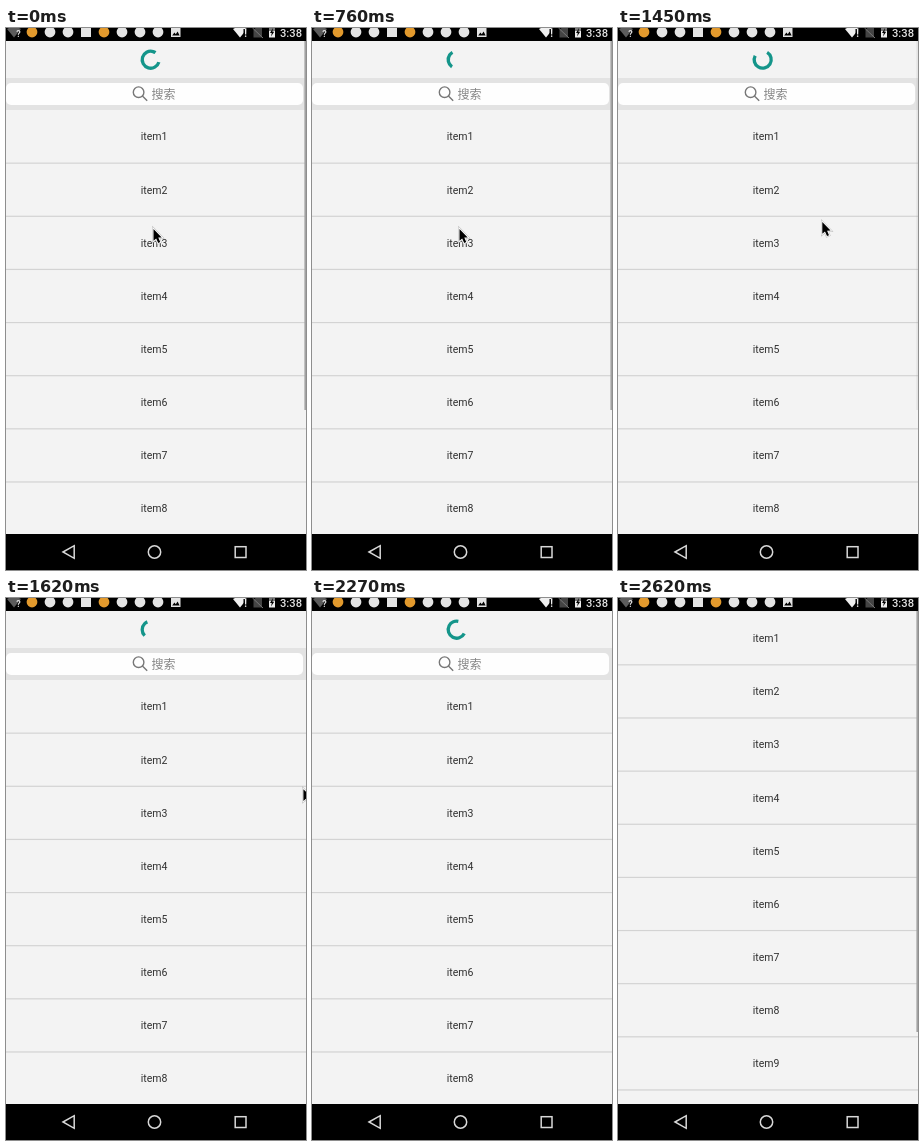
Recreate the animation shown at these times as an HTML page with a canvas. Size 300x542 px, loop 3790 ms.

```html
<!DOCTYPE html>
<html lang="zh">
<head>
<meta charset="utf-8">
<title>Pull to refresh</title>
<style>
html, body { margin: 0; width: 300px; height: 542px; overflow: hidden; background: #000; }
canvas { display: block; }
</style>
</head>
<body>
<canvas id="stage" width="300" height="542"></canvas>
<script>
const ctx = document.getElementById('stage').getContext('2d');
const LOOP = 3790, TOP = 13, BOTTOM = 506, ROW = 53.14, LIST_TOP = 82;
const CYCLE = 1332, SWEEP = 272, MIN_ARC = 16, TURN = 306;

const clamp = (v, lo, hi) => Math.min(hi, Math.max(lo, v));
// number of whole steps taken since a start time
const steps = (t, start, size, max) => clamp(Math.floor((t - start) / size) + 1, 0, max);

// cubic-bezier(.4, 0, .2, 1)
function ease(x) {
  if (x <= 0 || x >= 1) return clamp(x, 0, 1);
  let lo = 0, hi = 1, s;
  for (let i = 0; i < 20; i++) {
    s = (lo + hi) / 2;
    const u = 1 - s;
    if (1.2 * s * u * u + .6 * s * s * u + s * s * s < x) lo = s; else hi = s;
  }
  return s * s * (3 - 2 * s);
}

function rect(x, y, w, h, color) {
  ctx.fillStyle = color;
  ctx.fillRect(x, y, w, h);
}

function disc(x, y, r, color) {
  ctx.fillStyle = color;
  ctx.beginPath();
  ctx.arc(x, y, r, 0, 7);
  ctx.fill();
}

function path(points, closed) {
  ctx.beginPath();
  points.forEach(([x, y]) => ctx.lineTo(x, y));
  if (closed) ctx.closePath();
}

function fillPath(points, color) {
  path(points, true);
  ctx.fillStyle = color;
  ctx.fill();
}

function pen(color, width) {
  ctx.strokeStyle = color;
  ctx.lineWidth = width;
}

function label(text, x, y, font, color, align) {
  ctx.font = font;
  ctx.fillStyle = color;
  ctx.textAlign = align;
  ctx.fillText(text, x, y);
}

// The tail catches up with the head, then the head runs ahead, while all of it turns.
function spinner(t) {
  const turns = (80 + Math.floor((t - 50) / 170) * 170) / CYCLE;
  const n = Math.floor(turns), p = turns - n;
  const base = 37 + turns * TURN + n * SWEEP;
  const start = base + SWEEP * ease(p / .5);
  const end = base + MIN_ARC + SWEEP * (1 + ease((p - .42) / .5));
  pen('#14958a', 3.3);
  ctx.beginPath();
  ctx.arc(144.7, 31.7, 8.5, start * Math.PI / 180, end * Math.PI / 180);
  ctx.stroke();
}

function searchBar() {
  rect(0, 50, 300, LIST_TOP - 50, '#e3e3e3');
  ctx.fillStyle = '#fefefe';
  ctx.beginPath();
  ctx.roundRect(0, 55, 297, 22, 5);
  ctx.fill();
  pen('#777', 1.4);
  ctx.beginPath();
  ctx.arc(132.6, 64.2, 5.3, 0, 7);
  ctx.stroke();
  path([[136.4, 68], [141.2, 72.8]]);
  ctx.stroke();
  label('搜索', 145.5, 70.5, '12px "Noto Sans CJK SC", "Noto Sans CJK", sans-serif', '#858585', 'left');
}

function list() {
  rect(0, LIST_TOP, 300, 600, '#f3f3f3');
  for (let i = 0; i < 10; i++) {
    const y = LIST_TOP + i * ROW;
    label('item' + (i + 1), 148.1, y + 30.4, '10.5px Roboto, sans-serif', '#303030', 'center');
    rect(0, y + ROW - .6, 300, 1.2, '#d3d3d3');
  }
}

function thumb(alpha, end) {
  ctx.globalAlpha = alpha;
  rect(298.4, TOP, 1.6, end - TOP, '#a2a2a2');
  ctx.globalAlpha = 1;
}

function pointer(x, y) {
  const shape = [[0, 0], [0, 14], [3.2, 11.2], [5.6, 16.6], [8, 15.6], [5.7, 10.2], [9.8, 10]];
  const moved = shape.map(p => [p[0] * .84 + x, p[1] * .84 + y]);
  path(moved, true);
  pen('#bbb', 2.6);
  ctx.stroke();
  pen('#fff', 1.6);
  ctx.stroke();
  fillPath(moved, '#000');
}

function wifi(x, color) {
  fillPath([[x - 7, 1], [x - 3, -1], [x + 3, -1], [x + 7, 1], [x, 9.5]], color);
}

function statusBar() {
  rect(0, 0, 300, TOP, '#000');
  wifi(8, '#5c5c5c');
  label('?', 12.5, 9, 'bold 9px Roboto, sans-serif', '#ddd', 'center');
  for (let i = 0; i < 8; i++) {
    const x = 26 + i * 18;
    if (i === 3) rect(x - 5, -1, 10, 10, '#e4e4e4');
    else disc(x, 4, 5.4, i % 4 ? '#e4e4e4' : '#e39a2d');
  }

  rect(165, -1, 9.5, 10, '#e4e4e4');
  fillPath([[166.2, 7.4], [168.4, 4.6], [169.8, 6.2], [171.6, 3.6], [173.6, 7.4]], '#000');

  wifi(234, '#f0f0f0');
  rect(237.5, 1, 4, 9, '#000');
  label('!', 239.5, 9, 'bold 10px Roboto, sans-serif', '#f0f0f0', 'center');

  fillPath([[247.5, 2], [250.5, -1], [256, -1], [256, 9.5], [247.5, 9.5]], '#444');
  pen('#777', 1);
  path([[246.5, 0], [257, 10]]);
  ctx.stroke();

  rect(263, -1, 6, 4, '#777');
  rect(263, 3, 6, 6.5, '#eee');
  fillPath([[267, 0], [264, 5], [265.8, 5], [265, 8.6], [268.2, 3.8], [266.4, 3.8]], '#000');
  label('3:38', 296, 9.2, '500 11.2px Roboto, sans-serif', '#e4e4e4', 'right');
}

function navBar() {
  rect(0, BOTTOM, 300, 36, '#000');
  pen('#d8d8d8', 1.5);
  path([[57, 524], [68.2, 517.7], [68.2, 530.3]], true);
  ctx.stroke();
  ctx.beginPath();
  ctx.arc(148.5, 524, 6.2, 0, 7);
  ctx.stroke();
  ctx.strokeRect(229.2, 518.7, 10.8, 10.8);
}

function draw(t) {
  const leave = steps(t, 1338, 56, 8);
  const scroll = ease(steps(t, 2450, 56, 4) / 4);

  rect(0, 0, 300, 542, '#f3f3f3');
  ctx.save();
  ctx.translate(0, -68.3 * scroll);
  spinner(t);
  searchBar();
  list();
  ctx.restore();
  thumb(scroll ? 1 : clamp(1 - leave * .27, 0, 1), 382 + 52 * scroll);
  pointer(147.5 + 12.2 * leave ** 1.4, 201 - 4 * Math.sqrt(leave));
  statusBar();
  navBar();
}

const begin = performance.now();
function tick() {
  draw((performance.now() - begin) % LOOP);
  requestAnimationFrame(tick);
}
tick();
</script>
</body>
</html>
```
